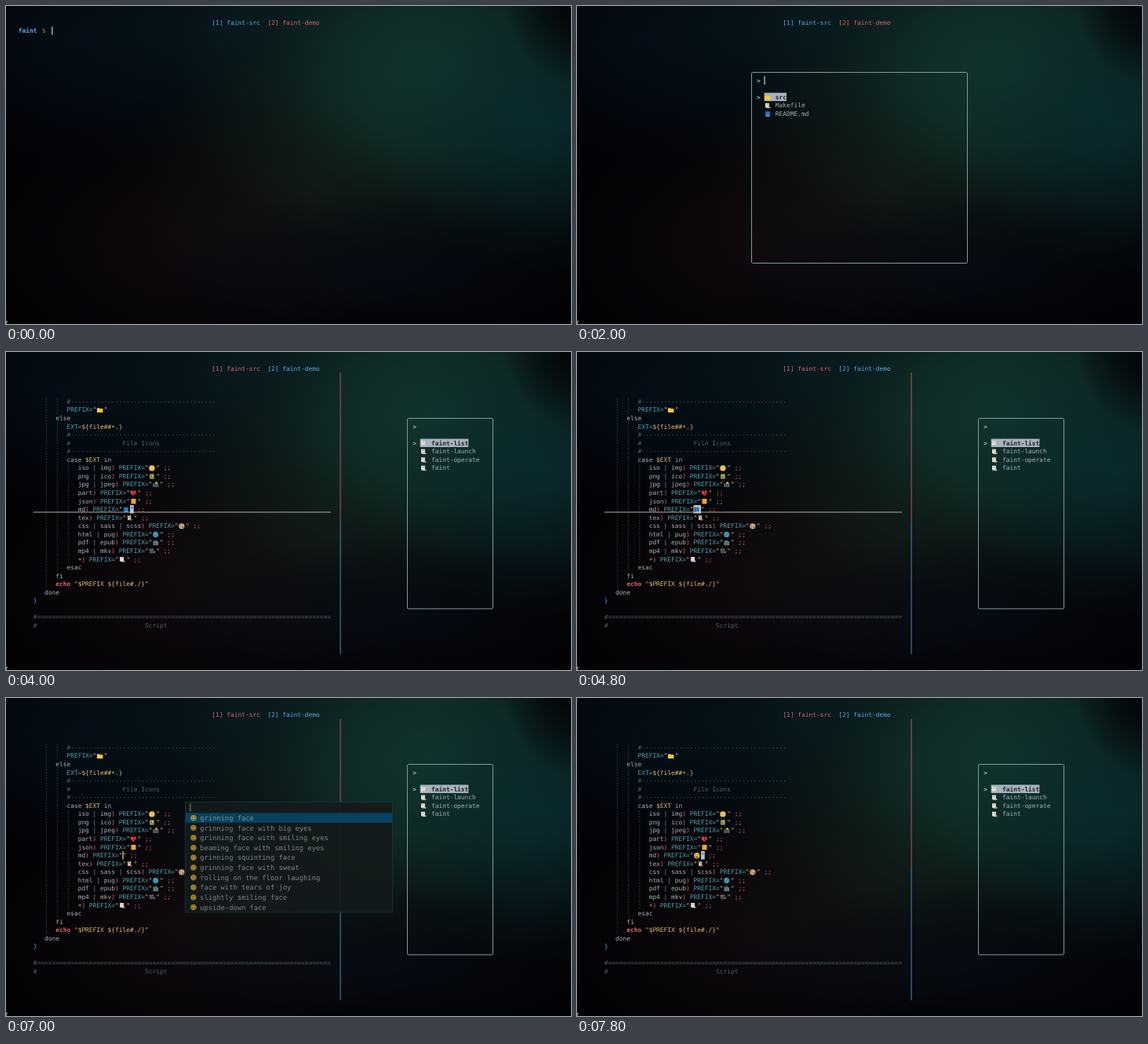
An HTML page with a canvas that plays this animation: 720 by 405 pixels, repeating every 8 s.

```html
<!DOCTYPE html>
<html lang="en">
<head>
<meta charset="utf-8">
<title>faint</title>
<style>
html, body { margin: 0; width: 100%; height: 100%; overflow: hidden; }
body {
  background:
    radial-gradient(95px 100px at 730px 0, rgba(2,3,6,.95), rgba(2,3,6,.6) 45%, transparent),
    radial-gradient(300px 100px at 490px 335px, rgba(7,12,20,.85), transparent),
    radial-gradient(210px 190px at 690px 150px, rgba(9,44,49,.8), rgba(9,40,45,.45) 50%, transparent),
    radial-gradient(330px 260px at 545px 80px, rgb(18,53,46), rgba(17,48,41,.85) 35%, rgba(14,36,32,.4) 68%, transparent),
    radial-gradient(230px 180px at 390px 220px, rgba(19,22,19,.9), transparent),
    radial-gradient(330px 200px at 290px 20px, rgba(7,24,31,.9), transparent),
    radial-gradient(230px 170px at 60px 50px, rgba(4,9,19,.9), transparent),
    radial-gradient(260px 170px at 230px 300px, rgba(16,9,14,.95), transparent),
    #020205;
}
canvas { display: block; width: 720px; height: 405px; }
</style>
</head>
<body>
<canvas id="stage"></canvas>
<script>
const canvas = document.getElementById('stage');
const ctx = canvas.getContext('2d');
const dpr = window.devicePixelRatio || 1;
canvas.width = 720 * dpr;
canvas.height = 405 * dpr;

// Terminal grid
const CW = 4.74, RH = 10.56;
const X = col => 15.8 + col * CW;
const Y = row => 20.8 + row * RH;

const C = {
  blue: '#5fa8e6', red: '#d9646d', cyan: '#519fab', yellow: '#dcb86f', text: '#a8b0b8',
  dim: '#53606a', guide: '#39434b', bar: '#a9b2bd', dark: '#1c222c', white: '#dde3e6',
  frame: '#84989b', green: '#8fba72', gold: '#8f7d35'
};

const disc = (x, y, r) => `M${x - r} ${y}a${r} ${r} 0 1 0 ${2 * r} 0a${r} ${r} 0 1 0 ${-2 * r} 0z`;
const box = (x, y, w, h) => `M${x} ${y}h${w}v${h}h${-w}z`;

// Each icon: colour, outline, colour, outline ...
const ICONS = {
  folder: ['#d9a021', box(-3.6, -2.8, 3.4, 2), '#fbcb35', box(-3.6, -1.8, 7.4, 4.8)],
  page: ['#e4e1da', box(-2.9, -3.1, 4.9, 5.6), '#c4c0b8', box(-1.2, 1.6, 4.6, 1.7), '#8d8a84', box(-1.8, -1.6, 2.6, .6)],
  scroll: ['#d5ccbf', box(-2.4, -3, 4.2, 5.6), '#8b6d50', box(-3.2, -3.2, 3, 1.3) + box(-.6, 2, 4, 1.3), '#4d4238', box(-1, -.8, 2, .8)],
  book: ['#2f78bb', box(-3, -3.1, 6, 6.4), '#184f87', box(-3, -3.1, 1.1, 6.4), '#a9c7e2', box(-2, 2.4, 5, .7)],
  ledger: ['#f0ac27', box(-2.8, -3.2, 6, 6.4), '#b97615', box(-2.8, -3.2, 1.1, 6.4)],
  disc: ['#eebe35', disc(0, 0, 3.7), '#f7ead0', disc(0, 0, 1.7), '#453c20', disc(0, 0, .7)],
  picture: ['#d1b545', box(-2.7, -3, 5.4, 6), '#4c7f5b', box(-1.7, -1.9, 3.4, 3.8), '#d8e4dd', disc(.6, -.6, .8)],
  camera: ['#5c6163', box(-3.4, -1.8, 7, 4.8), '#e9d58a', box(-.4, -3.4, 2.8, 1.8), '#222a2e', disc(0, .7, 1.7), '#8eb3c4', disc(0, .7, .8)],
  heart: ['#df3946', 'M0 3.4C-5-.2-4-3.2-2-3.2Q-.6-3.2 0-1.8Q.6-3.2 2-3.2C4-3.2 5-.2 0 3.4z', '#3b1218', 'M-.2-2l1 1.5-1.2 1 .9 1.8.1-1.7 1.2-1.1z'],
  palette: ['#dfb287', disc(0, 0, 3.6), '#cc4444', disc(-1.5, -1.2, .9), '#4b86c0', disc(1.2, -1.6, .8), '#5f9750', disc(-1.4, 1.3, .8), '#30251d', disc(1.5, 1, .9)],
  globe: ['#2f88c4', disc(0, 0, 3.6), '#6ba653', 'M-2.6-1.8l2.4-1.2 1 1.6-1.8 1.6zM.2.4l2.6-.6-.8 2.6-1.4.4z'],
  books: ['#3e8a62', box(-3.2, -2.6, 2.6, 5.8), '#3b7ca9', box(-.6, -3.2, 2, 6.4), '#8f7146', box(1.4, -1.8, 2, 5)],
  movie: ['#666b6d', disc(-1.7, -1.6, 1.6) + disc(1.2, -1.9, 1.3), '#4b5052', box(-3, -.4, 5, 3.2), '#747a7c', 'M2 .8l1.8-1.2v3.4l-1.8-1z'],
  grin: ['#f8c534', disc(0, 0, 3.7), '#4f3413', disc(-1.3, -1, .6) + disc(1.3, -1, .6), '#6a3818', 'M-2.2.6h4.4a2.2 2.2 0 0 1-4.4 0z', '#f5eee0', box(-1.7, .6, 3.4, .7)]
};

function icon(name, x, y, turn = 0) {
  ctx.save();
  ctx.translate(x, y);
  ctx.rotate(turn);
  const parts = ICONS[name];
  for (let i = 0; i < parts.length; i += 2) {
    ctx.fillStyle = parts[i];
    ctx.fill(new Path2D(parts[i + 1]));
  }
  ctx.restore();
}
const cellIcon = (name, col, row) => icon(name, X(col) + 4.2, Y(row) + .4);

function rect(color, x, y, w, h) {
  ctx.fillStyle = color;
  ctx.fillRect(x, y, w, h);
}

function write(s, x, y, color, pitch = CW, bold = false) {
  ctx.font = `${bold ? 'bold ' : ''}${pitch / .602}px "DejaVu Sans Mono", "Noto Sans Mono", monospace`;
  ctx.fillStyle = color;
  [...s].forEach((ch, i) => {
    if (ch !== ' ') ctx.fillText(ch, x + (i + .5) * pitch, y + pitch * .6 + (ch === '*' ? 1.4 : 0));
  });
}

// Writes alternating text and colour pieces, returns the next column
function put(col, row, ...pieces) {
  for (let i = 0; i < pieces.length; i += 2) {
    write(pieces[i], X(col), Y(row), pieces[i + 1]);
    col += pieces[i].length;
  }
  return col;
}

const caret = (col, row) => rect(C.white, X(col) - .1, Y(row) - 5.2, 1.1, 10.5);
const block = (col, row, cells) => rect('#bcc5cd', X(col), Y(row) - 5.3, cells * CW, RH);

function frame(x, y, w, h) {
  ctx.strokeStyle = C.frame;
  ctx.lineWidth = 1;
  ctx.beginPath();
  ctx.roundRect(x, y, w, h, 1.2);
  ctx.stroke();
}

function tabs(first, second) {
  put(52, 0, '[1] faint-src', first);
  put(67, 0, '[2] faint-demo', second);
}

function menu(col, items, selected) {
  put(col, 7, '>', C.white);
  items.forEach(([name, label], i) => {
    const row = 9 + i, on = i === selected;
    if (on) {
      put(col, row, '>', C.white);
      rect(C.bar, X(col + 2), Y(row) - 5.3, (label.length + 3) * CW, RH);
    }
    cellIcon(name, col + 2, row);
    write(label, X(col + 5), Y(row), on ? C.dark : C.text, CW, on);
  });
}

function shell(t) {
  const word = 'faint';
  const typed = t < 1000 ? 0 : t < 1200 ? 1 : t < 1400 ? 3 : t < 1600 ? 4 : 5;
  write(word, X(0), Y(1), C.blue, CW, true);
  write('$', 45.7, Y(1), C.gold);
  if (typed) put(9, 1, word.slice(0, typed), typed < 5 ? C.red : C.green, word.slice(typed), C.dim);
  if (t < 1800) caret(9 + typed, 1);
  else caret(0, 2);
}

function finder(t) {
  frame(222.5, 84.5, 275, 243);
  menu(45, [['folder', 'src'], ['page', 'Makefile'], ['book', 'README.md']], t < 2600 ? 0 : t < 3000 ? 1 : 2);
  caret(47, 7);
}

const CASES = [
  ['iso | img', 'disc'], ['png | ico', 'picture'], ['jpg | jpeg', 'camera'], ['part', 'heart'],
  ['json', 'ledger'], ['md', ''], ['tex', 'scroll'], ['css | sass | scss', 'palette'],
  ['html | pug', 'globe'], ['pdf | epub', 'books'], ['mp4 | mkv', 'movie'], ['*', 'page']
];

function guides(from, to, ...cols) {
  for (let row = from; row <= to; row++)
    for (const col of cols)
      for (let k = 0; k < 3; k++) rect(C.guide, X(col + .5) - .4, Y(row) - 4.4 + k * 3.5, .8, 2);
}

function caseLine(row, pattern, name, t) {
  const isMd = pattern === 'md';
  let col = 16;
  for (const ch of pattern) col = put(col, row, ch, ch === '|' ? C.cyan : C.text);
  col = put(col, row, ') ', C.red, 'PREFIX=', C.cyan, '"', C.yellow);
  const start = col;
  if (isMd) {
    name = t < 5200 ? 'book' : t < 7400 ? '' : 'grin';
    if (t < 4800 || t >= 7800) block(start + 2, row, 1);
    else if (t < 5200) block(start, row, 2);
    else if (t < 5400) block(start, row, 1);
  }
  if (name) {
    cellIcon(name, col, row);
    col += 2;
  }
  const covered = isMd && (t < 4800 || t >= 5200 && t < 5400 || t >= 7800);
  put(col, row, '" ', covered ? C.dark : C.yellow, ';;', C.red);
  if (isMd && t >= 5400 && t < 7800) caret(col, row);
}

function editor(t) {
  const rule = '#' + '-'.repeat(39);
  guides(4, 5, 7, 10);
  guides(6, 6, 7);
  guides(7, 11, 7, 10);
  guides(12, 23, 7, 10, 13);
  guides(24, 24, 7, 10);
  guides(25, 26, 7);
  if (t < 5400) rect('#b9aba1', X(4), 203.5, 80 * CW, 1);

  for (const row of [4, 8, 10]) put(13, row, rule, C.dim);
  put(13, 5, 'PREFIX=', C.cyan, '"', C.yellow);
  cellIcon('folder', 21, 5);
  put(23, 5, '"', C.yellow);
  put(10, 6, 'else', C.text);
  put(13, 7, 'EXT=', C.cyan, '${file##*.}', C.yellow);
  put(13, 9, '#', C.dim);
  put(28, 9, 'File Icons', C.dim);
  put(13, 11, 'case ', C.text, '$EXT ', C.yellow, 'in', C.text);
  CASES.forEach(([pattern, name], i) => caseLine(12 + i, pattern, name, t));
  put(13, 24, 'esac', C.text);
  put(10, 25, 'fi', C.text);
  write('echo', X(10), Y(26), C.red, CW, true);
  put(15, 26, '"$PREFIX ${file#./}"', C.yellow);
  put(7, 27, 'done', C.text);
  put(4, 28, '}', C.blue);
  put(4, 30, '#' + '='.repeat(79), C.dim);
  put(4, 31, '#', C.dim);
  put(34, 31, 'Script', C.dim);

  rect('#b0585c', 425.6, 26.3, 1, 189);
  rect('#4a86bd', 425.6, 215.3, 1, 169.5);
  frame(511.5, 84.5, 109, 242.5);
  menu(106, [['page', 'faint-list'], ['page', 'faint-launch'], ['page', 'faint-operate'], ['page', 'faint']], 0);
}

const FACES = ['grinning face', 'grinning face with big eyes', 'grinning face with smiling eyes',
  'beaming face with smiling eyes', 'grinning squinting face', 'grinning face with sweat',
  'rolling on the floor laughing', 'face with tears of joy', 'slightly smiling face', 'upside-down face'];

function picker(strength) {
  rect('rgba(20,26,27,.93)', 228.5, 132.5, 264, 140.5);
  ctx.strokeStyle = '#143b43';
  ctx.lineWidth = .8;
  ctx.strokeRect(228.5, 132.5, 264, 140.5);
  rect('#07415f', 229, 146.3, 263, 12.6);
  ctx.globalAlpha = strength;
  rect('#cfd6d8', 234.4, 134.5, 1, 10);
  FACES.forEach((label, i) => {
    const y = 152.7 + i * 12.65;
    icon('grin', 238.9, y, i === 6 ? -.7 : i === 9 ? Math.PI : 0);
    write(label, 247.2, y, '#c3cbcc', 5.275);
  });
  ctx.globalAlpha = 1;
}

function draw() {
  const t = performance.now() % 8000;
  ctx.setTransform(dpr, 0, 0, dpr, 0, 0);
  ctx.clearRect(0, 0, 720, 405);
  ctx.textAlign = 'center';
  ctx.textRendering = 'geometricPrecision';

  if (t < 4000) {
    tabs(C.blue, C.red);
    if (t < 2000) shell(t);
    else finder(t);
  } else {
    tabs(C.red, C.blue);
    editor(t);
    if (t >= 7000 && t < 7400) picker(t < 7200 ? .6 : 1);
  }
  // Window corner at the bottom left
  rect('#8b9294', 0, 401, 2.4, 1);
  rect('#8b9294', 0, 401, 1, 4);
  requestAnimationFrame(draw);
}
draw();
</script>
</body>
</html>
```
